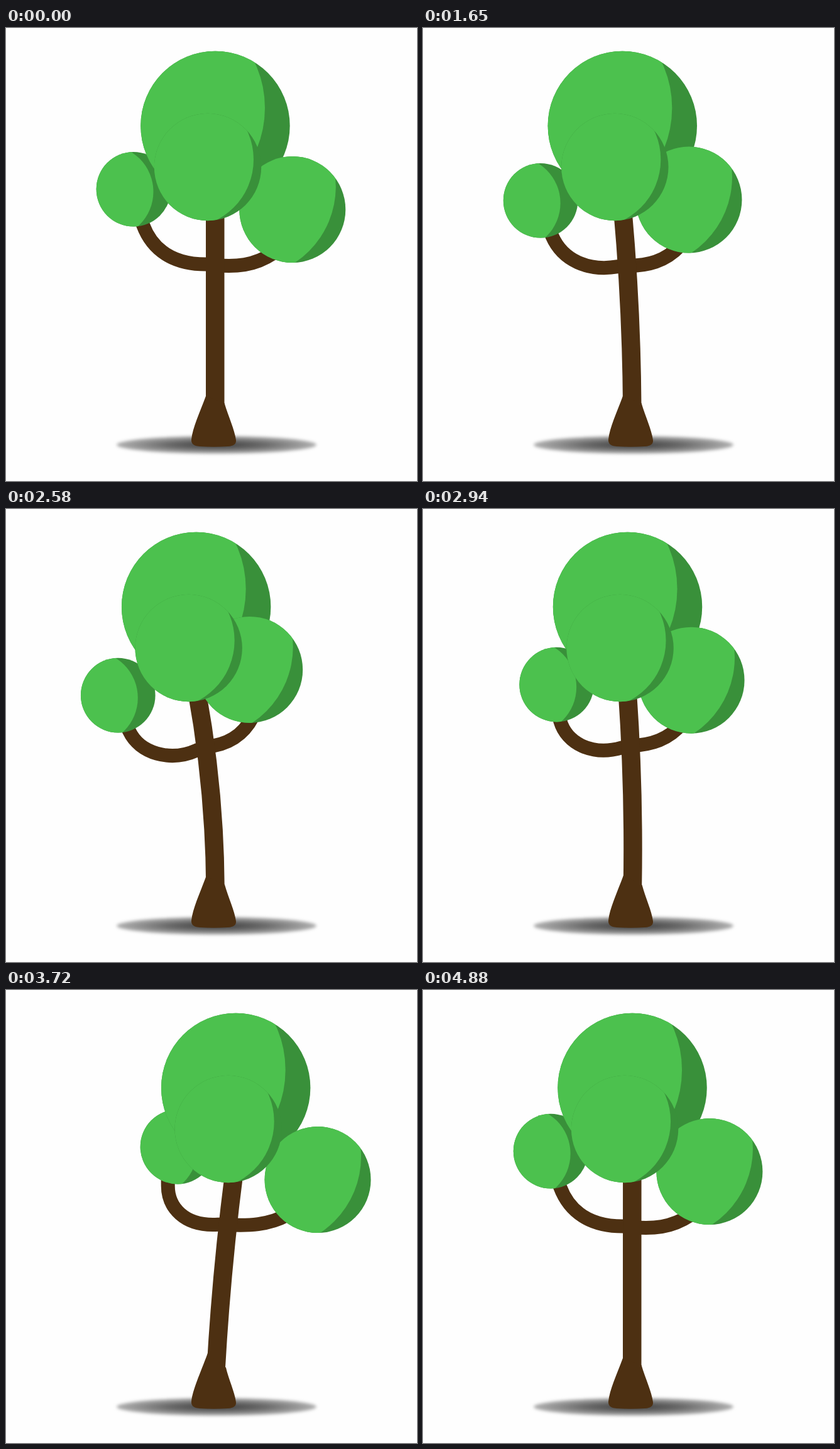
Recreate the animation shown at these times as an HTML page. Size 654 px wide and 720 px high, loop 5.38 s.

```html
<!DOCTYPE html>
<html lang="en">
<head>
<meta charset="utf-8">
<title>Swaying tree</title>
<style>
  html, body { margin: 0; height: 100%; overflow: hidden; background: #fefefe; }
  svg { display: block; width: 100vw; height: 100vh; }
  .wood { fill: #4d3012; }
  .branch { fill: none; stroke: #4d3012; stroke-width: 22; stroke-linecap: round; stroke-linejoin: round; }
  .shade { fill: #39903a; }
  .leaf { fill: #4cc14e; }
</style>
</head>
<body>
<svg viewBox="0 0 654 720">
  <defs>
    <radialGradient id="dusk">
      <stop offset="0" stop-color="#3c3c3c"/>
      <stop offset=".5" stop-color="#6a6a6a"/>
      <stop offset="1" stop-color="#b0b0b0"/>
    </radialGradient>
    <filter id="soft" x="-10%" y="-60%" width="120%" height="220%">
      <feGaussianBlur stdDeviation="2.6"/>
    </filter>
  </defs>
  <ellipse cx="335" cy="662.5" rx="159" ry="14" fill="url(#dusk)" filter="url(#soft)"/>
  <path id="leftBranch" class="branch"/>
  <path id="rightBranch" class="branch"/>
  <path id="trunk" class="wood"/>
  <path id="base" class="wood"/>
  <g id="crown"></g>
</svg>
<script>
const LOOP = 5380, START = 1130, LEFT = 2080, RIGHT = 3890, END = 4920;
const $ = id => document.getElementById(id);

// Points are [x, y, dx, dy at full left, dx, dy at full right].
const leftBranch = [
  [212, 297, -36, 48, 47, -6],
  [218, 313, -34, 48, 41, -4],
  [233, 353, -29, 44, 25, -9],
  [266, 375.5, -9, 32, 18, 0],
  [318, 375.5, -21, 10, 20, -3],
  [333, 375.5, -21, 5, 20, -3]
];
const rightBranch = [
  [333, 377, -21, 2, 20, -4],
  [365, 380, -21, -5, 21, -5],
  [395, 378, -27, -18, 24, -4],
  [425, 358, -43, -33, 24, 0]
];
const trunkEdge = x => [
  [x, 600, 0, 0, 1.5, 0],
  [x, 445, -2.8, 0, 10.5, 0],
  [x, 290, -40.5, 0, 31.5, 0]
];
const baseTop = [[318, 585, 0, 0, 3, -8], [347.5, 596, 0, 0, 2.5, 4]];

// Foliage balls, back to front: place, radius and the lit circle [dx, dy, radius].
const balls = [
  { at: [203, 256.2, -43, 49, 72, -8], r: 59.3, lit: [-42.5, 4, 74], bend: [-4.5, -1.7] },
  { at: [333, 155.5, -42.5, 0, 34, 0], r: 118.7, lit: [-91, -28.5, 170] },
  { at: [455.8, 288.5, -89, -42, 42.5, 14], r: 84.5, lit: [-76, -36.5, 145] },
  { at: [321, 221, -42.5, 0, 34, 0], r: 85.2, lit: [-35, -12, 108] }
];

$('crown').innerHTML = balls.map(({ r, lit: [x, y, litR] }, i) => `<g>
  <clipPath id="ball${i}"><circle r="${r}"/></clipPath>
  <circle class="shade" r="${r}"/>
  <circle class="leaf" cx="${x}" cy="${y}" r="${litR}" clip-path="url(#ball${i})"/>
</g>`).join('');
const groups = $('crown').children;

// cubic-bezier(x1, 0, x2, 1)
function ease(x, x1, x2) {
  let lo = 0, hi = 1, s;
  for (let i = 0; i < 24; i++) {
    s = (lo + hi) / 2;
    const bx = 3 * x1 * s * (1 - s) ** 2 + 3 * x2 * s * s * (1 - s) + s ** 3;
    if (bx < x) lo = s; else hi = s;
  }
  return s * s * (3 - 2 * s);
}

function sway(t) {
  if (t < START || t >= END) return { l: 0, r: 0, bend: 0 };
  if (t < LEFT) return { l: ease((t - START) / (LEFT - START), .42, 1), r: 0, bend: 0 };
  if (t < RIGHT) {
    const p = ease((t - LEFT) / (RIGHT - LEFT), .42, .58);
    return { l: 1 - p, r: p, bend: 0 };
  }
  const r = 1 - ease((t - RIGHT) / (END - RIGHT), 0, .58);
  return { l: 0, r, bend: 4 * r * (1 - r) };
}

function draw(t) {
  const { l, r, bend } = sway(t);
  const place = ([x, y, lx, ly, rx, ry]) => [x + l * lx + r * rx, y + l * ly + r * ry];
  const path = (id, d) => $(id).setAttribute('d', d);

  const [a, b, c, d, e, f] = leftBranch.map(place);
  path('leftBranch', `M${a}L${b}C${c} ${d} ${e}L${f}`);

  const [g, h, i, j] = rightBranch.map(place);
  path('rightBranch', `M${g}C${h} ${i} ${j}`);

  const [p0, p1, p2] = trunkEdge(318).map(place);
  const [q0, q1, q2] = trunkEdge(347.5).map(place);
  path('trunk', `M${p0}Q${p1} ${p2}L${q2}Q${q1} ${q0}Z`);

  const [u, v] = baseTop.map(place);
  path('base', `M${u}C308 612 297 635 295 654Q294 664 308 665Q330 666.5 353 665
    Q367 664 366 655C364 639 354 618 ${v}Z`);

  balls.forEach((ball, n) => {
    const [x, y] = place(ball.at);
    const [bx, by] = ball.bend || [0, 0];
    groups[n].setAttribute('transform', `translate(${x + bend * bx} ${y + bend * by})`);
  });
}

const begin = performance.now();
function tick() {
  draw((performance.now() - begin) % LOOP);
  requestAnimationFrame(tick);
}
tick();
</script>
</body>
</html>
```
